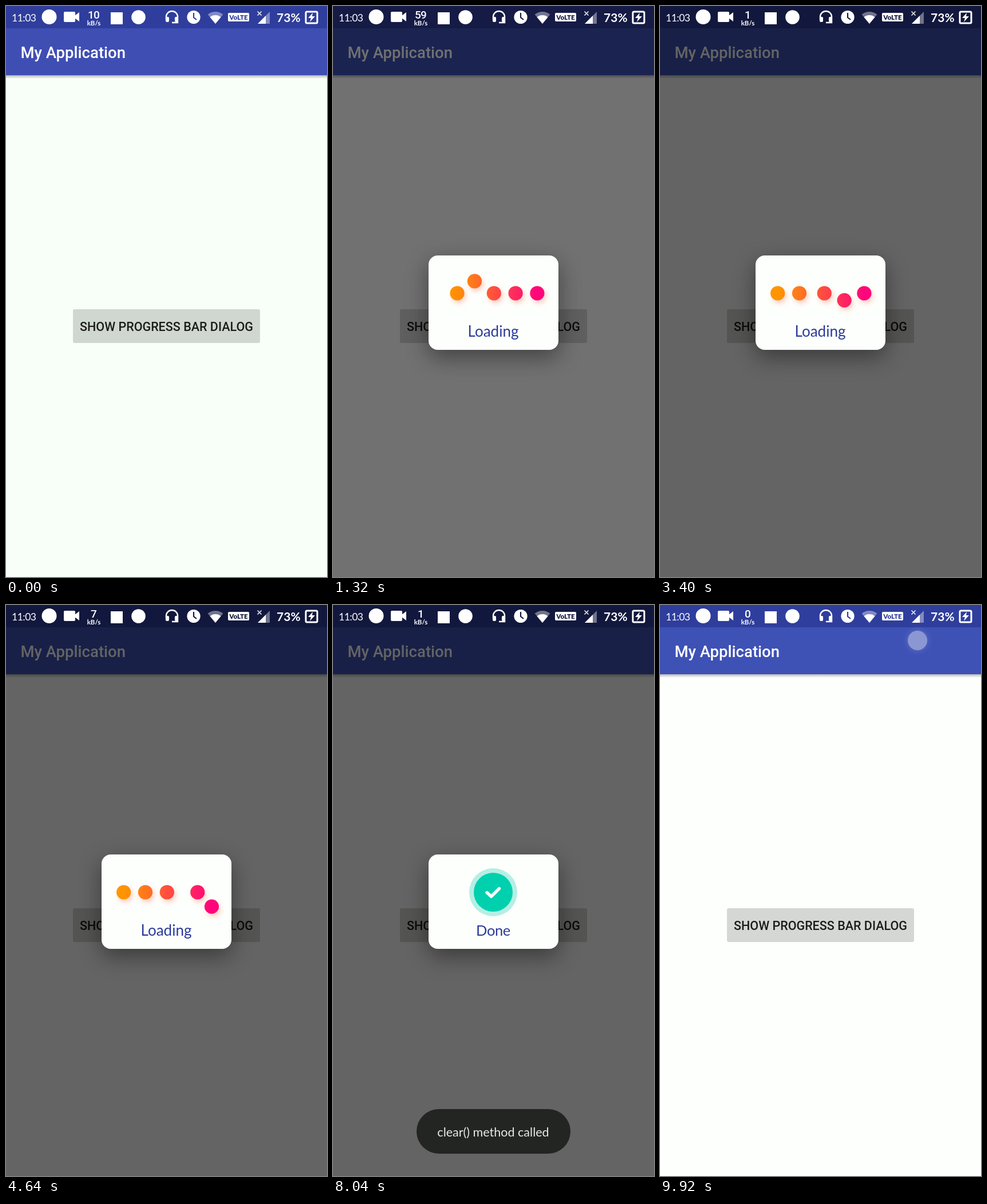
An HTML page with a canvas for the animation above (9.96 s loop, 561 px wide and 998 px high).

```html
<!DOCTYPE html>
<html lang="en">
<head>
<meta charset="utf-8">
<title>Progress dialog</title>
<style>
html, body { margin: 0; width: 100%; height: 100%; overflow: hidden; background: #fdfffc; }
canvas { display: block; width: 561px; height: 998px; }
</style>
</head>
<body>
<canvas id="stage" width="561" height="998"></canvas>
<script>
const W = 561, H = 998, LOOP = 9960, STEP = 40;
const OPEN = 1140, DONE = 6140, CLOSE = 8620;
const HOP = 140, REST = 112, DOTS_START = 1222;
const SLOT = 205.7, GAP = 37.8, ROW = 502;
const SPEEDS = [[0, 10], [480, 59], [2500, 1], [4500, 7], [6500, 1], [8500, 0]];
const INK = '#2b3a9b';

const main = document.getElementById('stage').getContext('2d');
const layer = Object.assign(document.createElement('canvas'), { width: W, height: H }).getContext('2d');
let ctx = main;

const clamp = v => Math.max(0, Math.min(1, v));
const ramp = (t, start, length) => clamp((t - start) / length);
const easeOut = u => 1 - (1 - u) * (1 - u);
const mix = (a, b, u) => a.map((v, i) => Math.round(v + (b[i] - v) * u));
const rgb = c => `rgb(${c.join(',')})`;

function text(str, x, y, font, color, align = 'left', spacing = 0.01) {
  ctx.font = font + ', sans-serif';
  ctx.letterSpacing = spacing + 'px';
  ctx.textAlign = align;
  ctx.fillStyle = color;
  ctx.fillText(str, x, y);
}

function disc(x, y, r, color) {
  ctx.fillStyle = color;
  ctx.beginPath();
  ctx.arc(x, y, r, 0, Math.PI * 2);
  ctx.fill();
}

function box(x, y, w, h, r, color) {
  ctx.fillStyle = color;
  ctx.beginPath();
  ctx.roundRect(x, y, w, h, r);
  ctx.fill();
}

function poly(color, ...p) {
  ctx.fillStyle = color;
  ctx.beginPath();
  for (let i = 0; i < p.length; i += 2) ctx.lineTo(p[i], p[i + 1]);
  ctx.closePath();
  ctx.fill();
}

function stroke(color, width, ...p) {
  ctx.strokeStyle = color;
  ctx.lineWidth = width;
  ctx.beginPath();
  for (let i = 0; i < p.length; i += 2) ctx.lineTo(p[i], p[i + 1]);
  ctx.stroke();
}

function withShadow(color, blur, dx, dy, draw) {
  ctx.save();
  ctx.shadowColor = color;
  ctx.shadowBlur = blur;
  ctx.shadowOffsetX = dx;
  ctx.shadowOffsetY = dy;
  draw();
  ctx.restore();
}

// Draws a group on its own layer so that it fades as one piece.
function faded(alpha, draw) {
  if (!alpha) return;
  layer.clearRect(0, 0, W, H);
  ctx = layer;
  draw();
  ctx = main;
  ctx.globalAlpha = alpha;
  ctx.drawImage(layer.canvas, 0, 0);
  ctx.globalAlpha = 1;
}

function wedge(r, color) {
  ctx.fillStyle = color;
  ctx.beginPath();
  ctx.moveTo(366, 31);
  ctx.arc(366, 31, r, -Math.PI * 0.72, -Math.PI * 0.28);
  ctx.fill();
}

function statusBar(t, bar) {
  const white = '#fff', faint = 'rgba(255,255,255,.4)';
  text('11:03', 10, 27, '400 17.5px Lato', white, 'left', -0.5);
  disc(75.5, 19, 13, white);
  box(101, 10, 20, 18, 2, white);
  poly(white, 120, 17, 128, 11, 128, 27, 120, 21);

  const speed = SPEEDS.filter(s => s[0] <= t).pop()[1];
  text(speed, 153, 22, '500 19px Roboto', white, 'center', -0.8);
  text('kB/s', 153.5, 34, '700 11.5px Lato', white, 'center');
  box(183, 11, 21, 21, 0, white);
  disc(231.5, 19.5, 12.3, white);

  // headset
  ctx.strokeStyle = white;
  ctx.lineWidth = 2.4;
  ctx.beginPath();
  ctx.moveTo(280, 24);
  ctx.lineTo(280, 19);
  ctx.arc(290, 19, 10, Math.PI, 0);
  ctx.lineTo(300, 29);
  ctx.lineTo(290, 29);
  ctx.stroke();
  box(279, 19, 6, 9, 2, white);
  box(295, 19, 6, 9, 2, white);

  // clock
  disc(328, 19.5, 11.6, white);
  stroke(bar, 2.2, 328, 12, 328, 20, 333, 24);

  wedge(21, faint);
  wedge(15, white);

  box(388, 12, 37, 15, 2, white);
  text('VoLTE', 406.5, 24, '900 11.5px Lato', bar, 'center');

  // signal
  poly(faint, 440, 31, 461, 10, 461, 31);
  poly(white, 440, 31, 454, 17, 454, 31);
  stroke(white, 1.4, 439.5, 9.5, 446.5, 16.5);
  stroke(white, 1.4, 446.5, 9.5, 439.5, 16.5);

  text('73%', 473, 27.5, '700 21px Lato', white);

  // battery
  ctx.strokeStyle = white;
  ctx.lineWidth = 3;
  ctx.beginPath();
  ctx.roundRect(524, 10, 20, 20, 2);
  ctx.stroke();
  poly(white, 536, 12, 528, 21, 533, 21, 531, 28, 540, 18, 535, 18);
}

function screen(t, dim) {
  const u = ramp(t, 600, 120);
  const fade = c => rgb(mix(c, [0, 0, 0], dim));
  ctx.fillStyle = fade(mix([248, 255, 248], [253, 255, 252], u));
  ctx.fillRect(0, 0, W, H);

  const shade = ctx.createLinearGradient(0, 121, 0, 127);
  shade.addColorStop(0, 'rgba(0,0,0,.28)');
  shade.addColorStop(1, 'rgba(0,0,0,0)');
  ctx.fillStyle = shade;
  ctx.fillRect(0, 121, W, 6);

  ctx.fillStyle = fade(mix([63, 78, 179], [62, 81, 181], u));
  ctx.fillRect(0, 39, W, 82);
  const bar = fade([47, 62, 156]);
  ctx.fillStyle = bar;
  ctx.fillRect(0, 0, W, 39);
  text('My Application', 25.5, 91, '500 27.5px Roboto', fade([255, 255, 255]));

  box(117, 530, 327, 59, 3, fade(mix([208, 215, 208], [213, 215, 212], u)));
  text('SHOW PROGRESS BAR DIALOG', 280.5, 567.5, '500 21.5px Roboto', fade([26, 28, 26]), 'center');
  statusBar(t, bar);
}

// One dot circles past its neighbour while that neighbour slides into its slot.
function dotPlaces(t) {
  const cycle = HOP * 8 + REST * 2;
  const phase = (((t - DOTS_START) % cycle) + cycle) % cycle;
  const back = phase >= cycle / 2;
  let run = clamp((phase - (back ? cycle / 2 : 0)) / (HOP * 4)) * 4;
  if (back) run = 4 - run;
  const slot = Math.min(3, Math.floor(run)), p = run - slot;
  const arc = Math.sin(Math.PI * p);
  const places = [];
  for (let i = 0; i < 5; i++) {
    if (i === slot) places.push([i + p + 0.5 * arc, (back ? 26 : -26) * arc]);
    else places.push([i === slot + 1 ? i - p : i, 0]);
  }
  return places.map(([x, y]) => [SLOT + x * GAP, ROW + y]);
}

function loading(t) {
  const color = ctx.createLinearGradient(SLOT, 0, SLOT + 4 * GAP, 0);
  ['#ff9500', '#ff781c', '#ff4f3e', '#ff285f', '#ff057c'].forEach((c, i) => color.addColorStop(i / 4, c));
  for (const [x, y] of dotPlaces(t)) {
    withShadow('rgba(255,120,90,.35)', 8, 3, 5, () => disc(x, y, 12.6, color));
  }
  text('Loading', 280, 578, '400 26px Lato', INK, 'center');
}

function done(t) {
  const grow = easeOut(ramp(t, DONE, 320));
  const pulse = 38 + 4 * Math.cos((t - 8040) / 1360 * Math.PI * 2);
  disc(280, ROW, pulse * grow, '#b5efe4');
  disc(280, ROW, 34 * grow, '#00d0ae');

  const tick = ramp(t, DONE + 200, 240);
  if (tick > 0) {
    const a = clamp(tick / 0.35), b = clamp((tick - 0.35) / 0.65);
    ctx.lineCap = ctx.lineJoin = 'round';
    stroke('#fdfffc', 5.4, 269, 502.5, 269 + 7.5 * a, 502.5 + 7 * a, 276.5 + 14 * b, 509.5 - 14 * b);
    ctx.lineCap = 'butt';
    ctx.lineJoin = 'miter';
  }
  text('Done', 280, 578, '400 25.5px Lato', INK, 'center', -0.4);
}

function dialog(t) {
  faded(ramp(t, OPEN, 120) * (1 - ramp(t, CLOSE, 113)), () => {
    withShadow('rgba(0,0,0,.42)', 38, 0, 13, () => box(167, 436, 227, 165, 16, '#fdfffc'));
    if (t < DONE) loading(t);
    else done(t);
  });
}

function toast(t) {
  faded(ramp(t, DONE + 20, 200) * (1 - ramp(t, 8260, 200)), () => {
    box(146, 881, 269, 78, 39, '#232522');
    text('clear() method called', 280, 929, '400 21.5px Lato', '#e8eae7', 'center');
  });
}

function touch(t) {
  const y = 18 + 44 * easeOut(ramp(t, 9800, 120));
  faded(t < 9800 ? 0 : 0.4, () => {
    withShadow('rgba(255,255,255,.5)', 12, 0, 0, () => disc(450, y, 17, '#fff'));
  });
}

function draw(time) {
  const t = Math.floor((time % LOOP) / STEP) * STEP;
  const dim = 0.607 * easeOut(ramp(t, OPEN, 253)) * (1 - ramp(t, CLOSE, 242));
  screen(t, dim);
  dialog(t);
  toast(t);
  touch(t);
}

let start;
function tick(now) {
  if (start === undefined) start = now;
  draw(now - start);
  requestAnimationFrame(tick);
}
draw(0);
requestAnimationFrame(tick);
</script>
</body>
</html>
```
